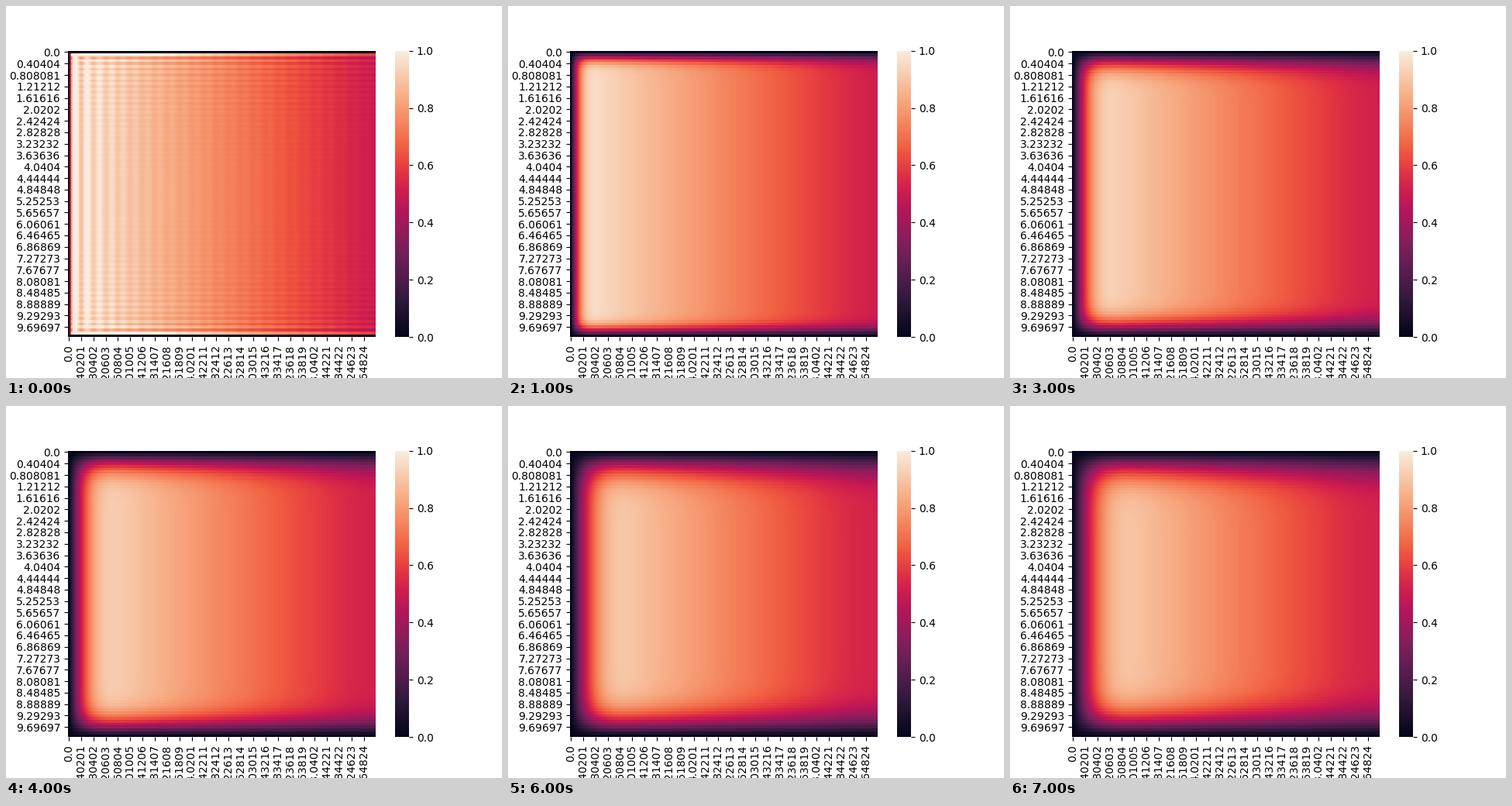
Recreate the animation shown at these times as a matplotlib script. Size 640 by 480 pixels, loop 8000 ms.

```python
import numpy as np
import matplotlib.pyplot as plt
from matplotlib.animation import FuncAnimation
from matplotlib.colors import LinearSegmentedColormap

SIZE = 10.0
NX, NY = 200, 100
MODES = 50
DIFFUSIVITY = 0.04
FRAMES = 8

# Dark violet to cream: (position out of 255, colour)
STOPS = [
    (0, "#03051a"), (23, "#221331"), (36, "#35193e"), (46, "#451c47"),
    (73, "#701f57"), (85, "#841e5a"), (93, "#921c5b"), (109, "#ad1759"),
    (116, "#b91657"), (127, "#cb1b4f"), (139, "#d92847"), (146, "#e13342"),
    (162, "#ed503e"), (170, "#f06043"), (182, "#f37651"), (209, "#f6a47c"),
    (219, "#f6b48f"), (232, "#f7c9aa"), (255, "#faebdd"),
]
cmap = LinearSegmentedColormap.from_list("heat", [(p / 255, c) for p, c in STOPS])

x = np.linspace(0, SIZE, NX)
y = np.linspace(0, SIZE, NY)
m = np.arange(MODES)
odd = 2 * m + 1

# Along x: cold left wall, insulated right wall, start 1 - x / 20
kx = odd * np.pi / (2 * SIZE)
cx = 2 / SIZE * (1 / kx - (-1.0) ** m / (2 * SIZE * kx**2))
# Along y: cold walls on both sides, start 1
ky = odd * np.pi / SIZE
cy = 4 / (np.pi * odd)


def profile(pos, k, coef, t):
    """Truncated sine series of the diffusing profile."""
    return np.sin(np.outer(pos, k)) @ (coef * np.exp(-DIFFUSIVITY * k**2 * t))


def field(t):
    return np.outer(profile(y, ky, cy, t), profile(x, kx, cx, t))


def tick_labels(values):
    return ["0.0" if v == 0 else f"{v:.6g}" for v in values]


fig, ax = plt.subplots(figsize=(6.4, 4.8), dpi=100)
mesh = ax.pcolormesh(field(0), cmap=cmap, vmin=0, vmax=1)
bar = fig.colorbar(mesh, ax=ax)
bar.outline.set_linewidth(0)

ax.set(xlim=(0, NX), ylim=(NY, 0))
ax.spines[:].set_visible(False)
ax.set_xticks(np.arange(0, NX, 8) + 0.5, tick_labels(x[::8]), rotation="vertical")
ax.set_yticks(np.arange(0, NY, 4) + 0.5, tick_labels(y[::4]))


def update(frame):
    mesh.set_array(field(frame))
    return [mesh]


anim = FuncAnimation(fig, update, frames=FRAMES, interval=1000, repeat=True)
plt.show()
```
